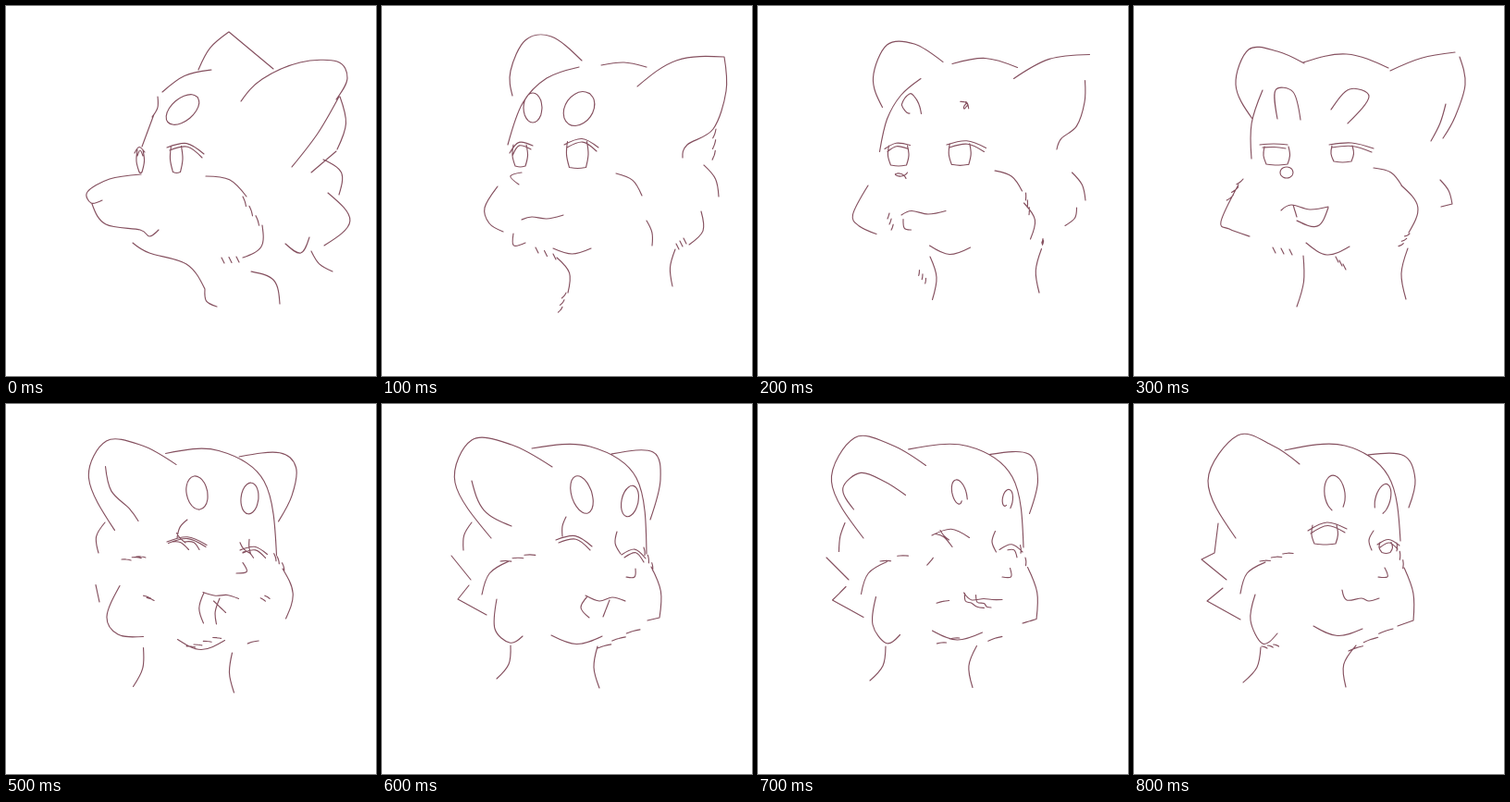
Write an HTML page that moves like this. It is 400x400 px and loops after 0.9 s.

```html
<!DOCTYPE html>
<html lang="en">
<head>
<meta charset="utf-8">
<title>Head turn</title>
<style>
  html, body { margin: 0; width: 100%; height: 100%; overflow: hidden; background: #fff; }
  svg { display: block; width: 100%; height: 100%; }
  path { fill: none; stroke: #85505f; stroke-width: 1.15; stroke-linecap: round; stroke-linejoin: round; }
</style>
</head>
<body>
<svg viewBox="0 0 400 400"><path id="ink"/></svg>
<script>
// Every drawing helper returns a list of strokes; a stroke is a list of points.
const mix = (a, b, t) => a + (b - a) * t;

function curve(...xy) {
  const points = [];
  for (let i = 0; i < xy.length; i += 2) points.push([xy[i], xy[i + 1]]);
  return [points];
}

// An arc between two points; bend pushes its middle to the left of the direction of travel.
function bow(x1, y1, x2, y2, bend = 0) {
  const k = bend / Math.hypot(x2 - x1, y2 - y1);
  return curve(x1, y1, (x1 + x2) / 2 + (y2 - y1) * k, (y1 + y2) / 2 - (x2 - x1) * k, x2, y2);
}

function oval(x, y, rx, ry, tilt = 0, from = 0, to = 360) {
  const rad = Math.PI / 180, c = Math.cos(tilt * rad), s = Math.sin(tilt * rad);
  return [Array.from({ length: 13 }, (_, i) => {
    const a = mix(from, to, i / 12) * rad;
    const u = rx * Math.cos(a), v = ry * Math.sin(a);
    return [x + u * c - v * s, y + u * s + v * c];
  })];
}

// A doubled lid, with an open iris below it when a width is given.
function eye(x1, y1, x2, y2, bend, x, width, height) {
  const lids = [...bow(x1, y1, x2, y2, bend), ...bow(x1 + 3, y1 + 3, x2 - 2, y2 + 4, bend)];
  if (!width) return lids;
  const top = (y1 + y2) / 2 - bend + 3, bottom = top + height;
  const left = x - width / 2, right = x + width / 2;
  return [...lids, ...bow(left, top, left + 2, bottom - 1, -2),
    ...bow(right, top, right - 1, bottom - 1, 2), ...bow(left + 2, bottom - 1, right - 1, bottom - 1, -1)];
}

// Three overlapping slanted hairs along a line.
function jag(x1, y1, x2, y2) {
  const k = 3 / Math.hypot(x2 - x1, y2 - y1);
  return [0, 1, 2].flatMap(i => {
    const t = i / 3, u = (i + 0.85) / 3;
    return bow(mix(x1, x2, t), mix(y1, y2, t),
      mix(x1, x2, u) - (y2 - y1) * k, mix(y1, y2, u) + (x2 - x1) * k, 0.5);
  });
}

// Three parallel short hairs.
const hatch = (x1, y1, x2, y2) => [0, 0.5, 1].flatMap(t => {
  const x = mix(x1, x2, t), y = mix(y1, y2, t);
  return bow(x, y, x + 3, y + 6);
});

const profile = {
  earL: [bow(208, 69, 241, 28, 5), bow(241, 28, 289, 68)],
  earR: [curve(254, 103, 277, 79, 318, 61, 358, 60, 369, 78, 357, 101),
    bow(361, 98, 358, 155, 8), bow(360, 98, 309, 174, 3), bow(357, 157, 330, 180)],
  head: [bow(222, 69, 169, 93, -6), bow(160, 117, 147, 152)],
  brows: [oval(191, 112, 21, 12, -40), bow(164, 98, 158, 120, 3)],
  eyeL: [eye(139, 159, 150, 158, 6, 145, 6, 25)],
  eyeR: [eye(174, 153, 214, 160, 8, 184, 11, 29)],
  nose: [curve(146, 182, 112, 187, 88, 201, 92, 213, 104, 210)],
  mouth: [curve(93, 214, 108, 236, 145, 242, 155, 249, 165, 242)],
  chin: [curve(137, 256, 155, 267, 195, 279, 215, 306)],
  cheekL: [bow(216, 184, 260, 206, 8)],
  cheekR: [bow(277, 237, 256, 272, 11), bow(343, 166, 360, 204, 12),
    bow(348, 202, 344, 259, 26), bow(302, 257, 328, 250, -14)],
  neck: [bow(215, 306, 228, 325, -6), bow(265, 287, 296, 322, 12), bow(330, 265, 353, 287, -4)],
  fur: [jag(256, 206, 277, 237), hatch(233, 272, 249, 271)]
};

const threeQuarter = {
  earL: [curve(141, 97, 139, 70, 155, 37, 183, 33, 216, 59)],
  earR: [bow(276, 87, 370, 55, 13), curve(370, 55, 372, 92, 358, 133, 330, 150, 325, 164)],
  head: [bow(237, 64, 286, 66, 4), curve(213, 66, 178, 78, 152, 105, 136, 150)],
  brows: [oval(163, 110, 10, 16), oval(213, 111, 20, 15, -55)],
  eyeL: [eye(138, 159, 163, 151, 8, 149, 14, 24)],
  eyeR: [eye(197, 150, 234, 153, 8, 211, 21, 29)],
  nose: [bow(151, 180, 148, 193, -11)],
  mouth: [curve(151, 231, 162, 228, 178, 230, 196, 226), bow(142, 246, 155, 256, -10)],
  chin: [bow(185, 262, 226, 262, -6)],
  cheekL: [curve(125, 195, 111, 218, 116, 235, 131, 244)],
  cheekR: [bow(253, 181, 281, 205, 6), bow(286, 232, 292, 259, 3),
    bow(348, 172, 364, 206, 5), bow(345, 222, 332, 258, 9)],
  neck: [bow(189, 272, 201, 310, 8), bow(317, 263, 314, 303, -4)],
  fur: [hatch(166, 261, 185, 268), jag(199, 310, 193, 333), jag(361, 133, 360, 168), hatch(318, 257, 326, 251)]
};

const smirk = {
  earL: [curve(128, 122, 110, 85, 124, 47, 155, 49, 184, 62)],
  earR: [bow(277, 70, 347, 50, 4), curve(352, 55, 358, 85, 347, 120, 334, 143), bow(337, 106, 321, 146, 2)],
  head: [bow(183, 61, 275, 67, 12), bow(139, 91, 127, 165, -6)],
  brows: [curve(155, 122, 153, 91, 172, 93, 180, 123), curve(213, 112, 233, 90, 254, 98, 231, 127)],
  eyeL: [eye(136, 150, 166, 150, 1, 154, 26, 20)],
  eyeR: [eye(211, 150, 259, 154, 4, 225, 22, 18)],
  nose: [oval(165, 180, 7, 6)],
  mouth: [curve(159, 221, 170, 215, 190, 220, 210, 217), bow(210, 218, 176, 232, 14), bow(172, 215, 176, 228)],
  chin: [bow(186, 256, 233, 260, -11)],
  cheekL: [curve(113, 193, 94, 233, 103, 241, 125, 249)],
  cheekR: [bow(259, 175, 290, 195, 6), bow(289, 194, 297, 245, 14),
    bow(331, 188, 344, 214, 3), bow(344, 214, 332, 217)],
  neck: [bow(183, 270, 176, 325, 4), bow(296, 262, 294, 317, -6)],
  fur: [jag(118, 187, 102, 213), hatch(150, 261, 168, 263), hatch(218, 271, 226, 279), jag(298, 246, 288, 262)]
};

const yawn = {
  earL: [curve(117, 128, 100, 75, 120, 41, 155, 46, 184, 63), curve(118, 52, 122, 84, 147, 106, 146, 121)],
  head: [curve(183, 59, 235, 55, 283, 87, 299, 165)],
  earR: [curve(256, 60, 310, 53, 330, 70, 320, 105, 299, 129)],
  brows: [oval(197, 94, 12, 16), oval(259, 99, 10, 17)],
  eyeL: [eye(160, 151, 207, 151, 6, 181, 26, 10), bow(193, 128, 175, 146, -4)],
  eyeR: [eye(247, 153, 280, 158, 4, 261, 22, 8)],
  nose: [bow(238, 165, 234, 179, 12)],
  mouth: [bow(206, 200, 240, 208, 2), bow(206, 200, 203, 243, -2),
    bow(240, 212, 231, 245, 2), bow(203, 214, 236, 221)],
  chin: [bow(188, 259, 235, 260, -12)],
  cheekL: [bow(117, 128, 112, 164, -8), bow(112, 180, 89, 200), curve(122, 182, 96, 217, 104, 240, 145, 252)],
  cheekR: [bow(307, 180, 305, 233, 13)],
  neck: [bow(158, 266, 151, 314, 4), bow(256, 276, 258, 317, -3)],
  fur: [jag(122, 166, 150, 162), jag(143, 251, 164, 264), hatch(173, 256, 183, 257),
    jag(258, 270, 286, 254), jag(292, 160, 312, 178)]
};

const smile = {
  earL: [curve(118, 145, 79, 85, 97, 39, 140, 44, 184, 68), bow(97, 83, 140, 132, -11)],
  head: [curve(162, 48, 225, 46, 275, 80, 286, 162)],
  earR: [curve(248, 54, 293, 52, 301, 82, 290, 125)],
  brows: [oval(216, 98, 11, 21, -18), oval(268, 105, 9, 17, 12)],
  eyeL: [eye(188, 147, 227, 154, 8), bow(199, 122, 195, 143, -2)],
  eyeR: [eye(259, 163, 285, 167, 8), bow(254, 138, 258, 162, -4)],
  nose: [bow(274, 178, 264, 187, 6)],
  mouth: [curve(220, 207, 235, 213, 249, 209, 263, 213), bow(222, 208, 224, 231, -8), bow(246, 212, 239, 230)],
  chin: [bow(183, 250, 238, 251, -9)],
  cheekL: [bow(97, 128, 88, 158, -4), bow(75, 164, 96, 190), bow(94, 196, 82, 211), bow(82, 211, 113, 228),
    bow(108, 206, 137, 170, 8), curve(124, 211, 122, 243, 138, 258, 152, 251)],
  cheekR: [bow(291, 176, 300, 231, 6), bow(300, 231, 287, 234)],
  neck: [bow(139, 261, 124, 297, 6), bow(233, 262, 235, 307, -5)],
  fur: [jag(128, 170, 167, 160), jag(233, 264, 280, 240), jag(283, 155, 296, 180)]
};

const awake = {
  earL: [curve(110, 145, 80, 83, 112, 34, 150, 45, 179, 65)],
  head: [curve(163, 50, 228, 45, 275, 78, 288, 148)],
  earR: [curve(253, 55, 292, 56, 304, 82, 297, 112)],
  brows: [oval(217, 97, 11, 20, -8, 120, 410), oval(269, 103, 8, 17, 15, 140, 420)],
  eyeL: [eye(188, 137, 230, 135, 8, 206, 26, 21)],
  eyeR: [eye(263, 152, 287, 153, 6, 272, 12, 12), bow(259, 137, 257, 158, -4)],
  nose: [bow(271, 177, 264, 187, 8)],
  mouth: [curve(225, 201, 230, 212, 246, 210, 254, 213, 265, 210)],
  chin: [bow(194, 240, 247, 243, -9)],
  cheekL: [bow(91, 129, 87, 161), bow(73, 168, 100, 190), bow(96, 199, 79, 213), bow(79, 213, 115, 233),
    bow(115, 205, 142, 171, 8), curve(131, 206, 126, 234, 139, 259, 155, 248)],
  cheekR: [bow(292, 177, 302, 234, 5), bow(302, 234, 285, 240)],
  neck: [bow(137, 263, 118, 301, 6), bow(240, 261, 229, 306, -8)],
  fur: [jag(136, 170, 173, 158), jag(232, 267, 281, 239), jag(138, 262, 157, 259),
    jag(284, 150, 294, 178), bow(87, 161, 73, 168)]
};

// Evenly spaced points along a stroke.
function resample(points, count) {
  return Array.from({ length: count }, (_, n) => {
    const at = (points.length - 1) * n / (count - 1);
    const i = Math.min(Math.floor(at), points.length - 2);
    return points[i].map((v, axis) => mix(v, points[i + 1][axis], at - i));
  });
}

function between(a, b) {
  const middle = {};
  for (const part in a) {
    const from = a[part].flat(), to = b[part].flat();
    middle[part] = [from.map((stroke, i) => {
      const mate = to[Math.round(i * (to.length - 1) / Math.max(1, from.length - 1))];
      const count = Math.max(stroke.length, mate.length);
      const end = resample(mate, count);
      return resample(stroke, count).map((p, n) => p.map((v, axis) => mix(v, end[n][axis], 0.5)));
    })];
  }
  return middle;
}

const show = p => p.map(v => v.toFixed(1)).join(' ');

// A smooth spline through the points with relaxed ends.
function smooth(points) {
  const relaxed = (p, q, r) => p.map((v, k) => q[k] - 3 * (q[k] - v) + (r[k] - v) / 2);
  const last = points.length - 1;
  let d = 'M' + show(points[0]);
  for (let i = 0; i < last; i++) {
    const p = points[i], q = points[i + 1];
    const before = i > 0 ? points[i - 1] : relaxed(p, q, points[i + 2] || q);
    const after = i + 1 < last ? points[i + 2] : relaxed(q, p, points[i - 1] || p);
    const c1 = p.map((v, k) => v + (q[k] - before[k]) / 6);
    const c2 = q.map((v, k) => v - (after[k] - p[k]) / 6);
    d += 'C' + [c1, c2, q].map(show).join(' ');
  }
  return d;
}

const outline = pose => Object.values(pose).flat(2).map(smooth).join('');

const steps = [
  profile, threeQuarter, between(threeQuarter, smirk), smirk, yawn,
  between(yawn, smile), smile, between(smile, awake), awake
].map(outline);

const STEP = 100;
const ink = document.getElementById('ink');
const start = performance.now();
let shown = -1;

function draw(now) {
  const step = Math.floor(Math.max(0, now - start) / STEP) % steps.length;
  if (step !== shown) ink.setAttribute('d', steps[shown = step]);
  requestAnimationFrame(draw);
}
draw(start);
</script>
</body>
</html>
```
